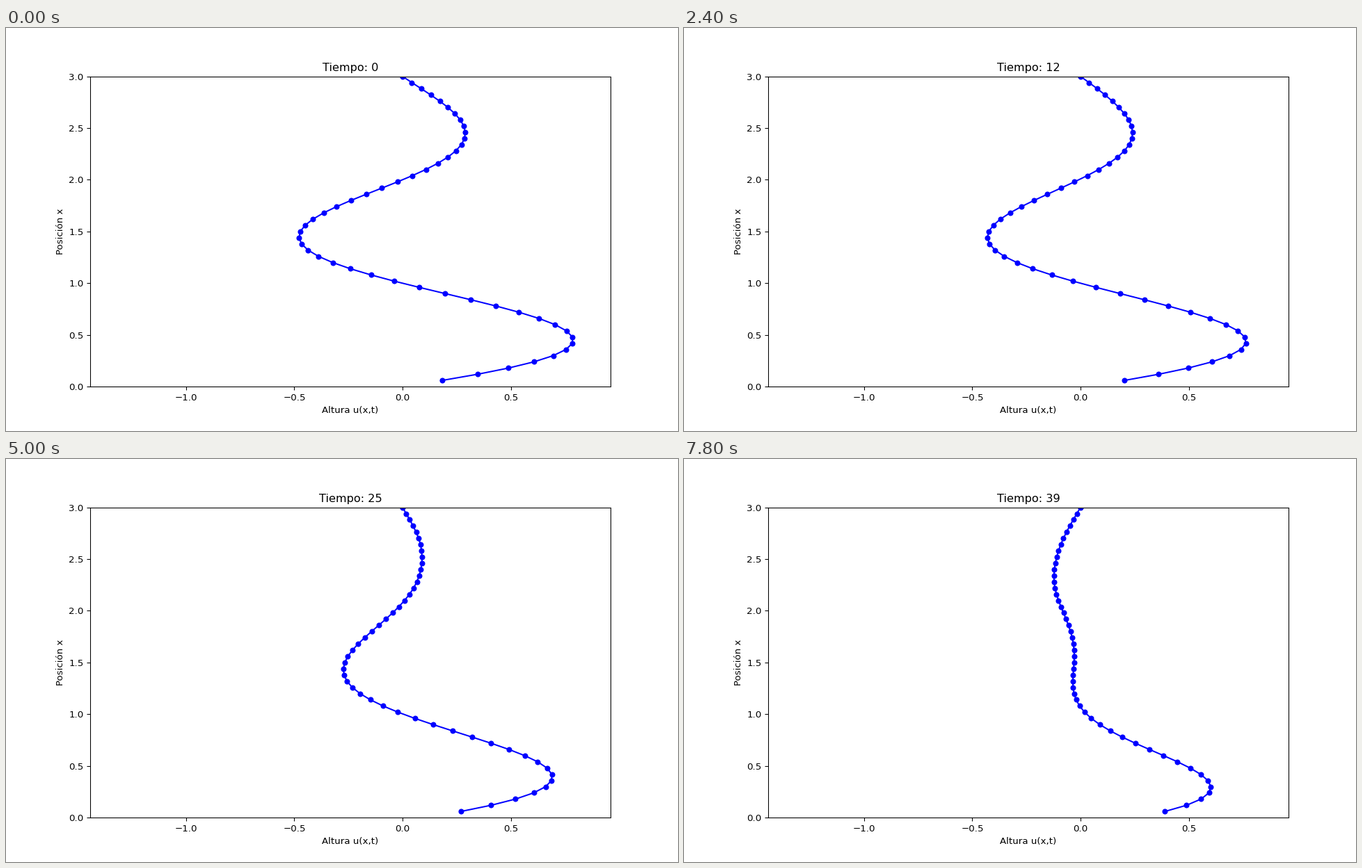
A matplotlib script that plays this animation: 966 px wide and 580 px high, repeating every 8 s.

```python
import numpy as np
import matplotlib.pyplot as plt
from matplotlib.animation import FuncAnimation

LENGTH, N = 3.0, 50
GRAVITY, DT = 9.8, 1 / 300
STEPS, INTERVAL = 40, 200

dx = LENGTH / N
x = dx * np.arange(1, N + 1)


def acceleration(u):
    """Hanging chain: tension grows with height, top end fixed."""
    pull = x[:-1] * np.diff(u) / dx
    acc = np.zeros(N)
    acc[:-1] = GRAVITY * np.diff(pull, prepend=0) / dx
    return acc


def simulate():
    start = np.exp(-x / 2) * np.sin(np.pi * x)
    states = [start, start]
    while len(states) < STEPS:
        prev, cur = states[-2:]
        states.append(2 * cur - prev + DT**2 * acceleration(cur))
    return states


states = simulate()

# 966 x 580 pixels
fig, ax = plt.subplots(figsize=(10, 6.0042), dpi=96.6)
ax.set_xlim(-1.444, 0.9624)
ax.set_ylim(0, LENGTH)
ax.set_xticks([-1.0, -0.5, 0.0, 0.5])
ax.set_xlabel("Altura u(x,t)")
ax.set_ylabel("Posición x")
title = ax.set_title("Tiempo: 0")
(chain,) = ax.plot(states[0], x, "o-", color="blue", lw=1.5, markersize=5)


def update(step):
    chain.set_data(states[step], x)
    title.set_text(f"Tiempo: {step}")
    return chain, title


anim = FuncAnimation(fig, update, frames=STEPS, interval=INTERVAL,
                     repeat=True, repeat_delay=0, blit=False)
plt.show()
```
